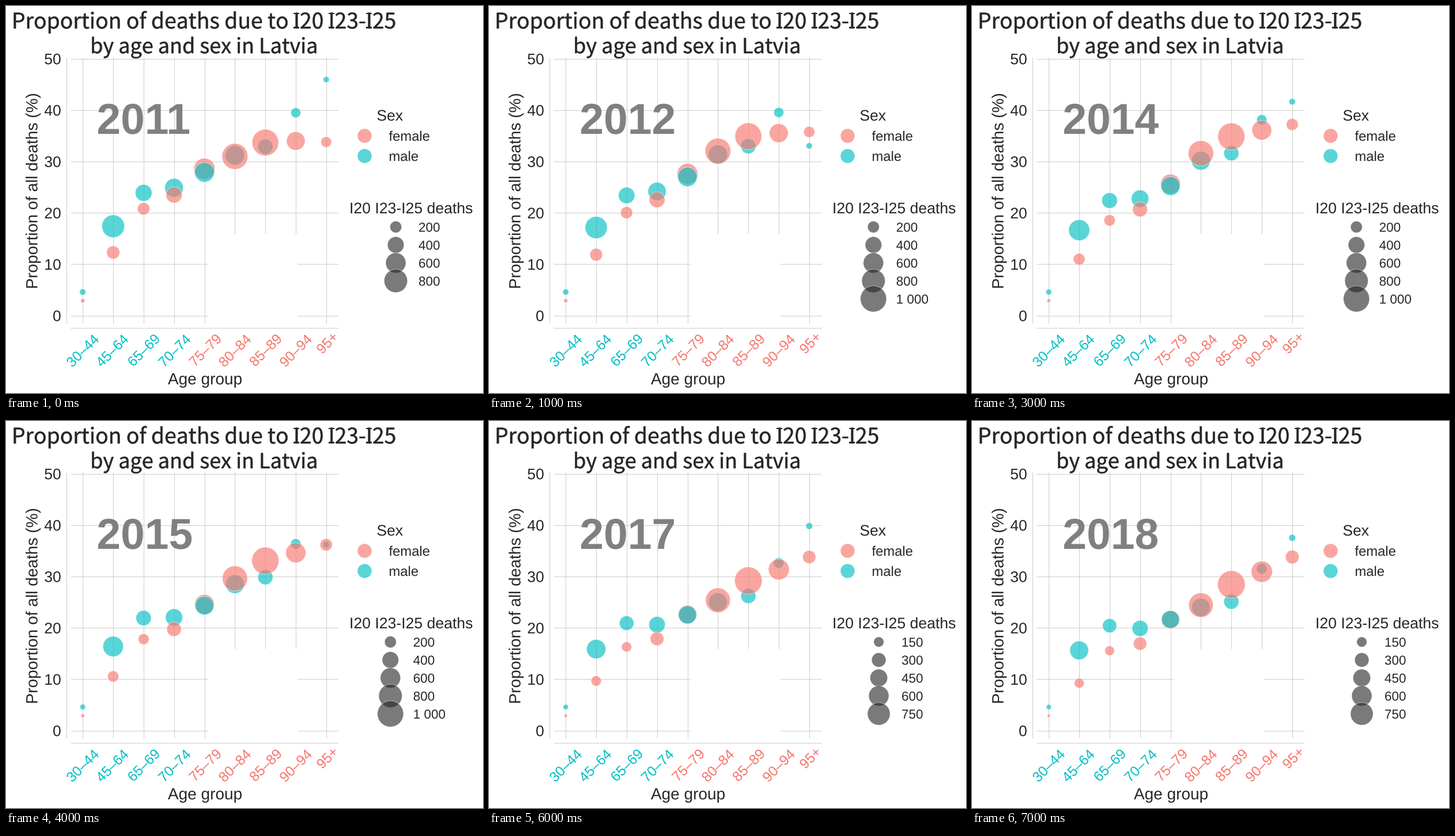
Write a matplotlib script that moves like this. It is 828 px wide and 672 px high and loops after 8 s.

```python
import numpy as np
import matplotlib.pyplot as plt
from matplotlib.animation import FuncAnimation
from matplotlib.patches import Circle, PathPatch, Rectangle
from matplotlib.textpath import TextPath
from matplotlib.transforms import Affine2D

W, H, DPI = 828, 672, 96
INK, GRID, YEAR_GRAY = "#262626", "#cccccc", "#808080"
FEMALE, MALE = "#F8766D", "#00BFC4"
SANS = {"family": "Liberation Sans"}
BOLD = {"family": "Liberation Sans", "weight": "bold"}
TITLE = {"family": "Noto Sans CJK JP"}

FIRST, YEARS = 2011, 8
AGES = ["30–44", "45–64", "65–69", "70–74", "75–79",
        "80–84", "85–89", "90–94", "95+"]
age = np.arange(len(AGES))
XS = 133.2 + 52.83 * age

# opening curves by age: share of deaths in percent, bubble radius in pixels
FEMALE_SHARE = [2.9, 12.3, 20.8, 23.5, 28.6, 31.0, 33.7, 34.0, 33.8]
MALE_SHARE = [4.6, 17.4, 23.9, 24.9, 27.9, 31.2, 32.9, 39.5, 38.5]
FEMALE_RADIUS = [3.6, 11.3, 10.8, 14, 18.2, 22.4, 23, 16, 9.2]
MALE_RADIUS = [5.4, 19.6, 14.5, 16, 17, 16.7, 13, 8.6, 5.2]

fig = plt.figure(figsize=(W / DPI, H / DPI), dpi=DPI, facecolor="white")
ax = fig.add_axes([0, 0, 1, 1])
ax.set_xlim(0, W)
ax.set_ylim(H, 0)
ax.axis("off")


def shares(k):
    """Shares sink over the years; the old first rise, the oldest men swing."""
    t = k / (YEARS - 1)
    rise = 3.5 * np.sin(np.pi * min(t / 0.75, 1)) * (age >= 5)
    swing = 8.5 * 0.75 ** k * np.cos(2 * np.pi * k / 3 + 0.5) * (age == 8)
    female_drop = 7 * (1 - ((age - 4) / 4) ** 2)
    male_drop = 8 * np.sin(np.pi * age / 14) * (age < 8)
    female = FEMALE_SHARE - female_drop * t + rise
    male = MALE_SHARE - male_drop * t + 0.6 * rise * (age < 8) + swing
    return female, male


def radii(k):
    """Young groups shrink and old groups grow."""
    t = k / (YEARS - 1)
    female = FEMALE_RADIUS * (1 + t * (0.0083 * age ** 2 - 0.26))
    male = MALE_RADIUS * (1 + t * (0.005 * age ** 2 - 0.18))
    return female, male


def share_y(v):
    return 537.65 - 8.92 * v


def text(s, x, y, size, color=INK, prop=SANS, ha="l", va="base", rot=0,
         z=3, lw=0):
    """Place text by its origin or by the edges of its ink."""
    path = TextPath((0, 0), s, size=size, prop=prop)
    path = path.transformed(Affine2D().rotate_deg(rot).scale(1, -1))
    box = path.get_extents()
    dx = {"l": 0, "ink": box.x0, "c": (box.x0 + box.x1) / 2, "r": box.x1}[ha]
    dy = {"base": 0, "top": box.y0, "c": (box.y0 + box.y1) / 2}[va]
    path = path.transformed(Affine2D().translate(x - dx, y - dy))
    return ax.add_patch(PathPatch(path, fc=color, ec=color, lw=lw, zorder=z))


def line(x0, y0, x1, y1):
    ax.plot([x0, x1], [y0, y1], color=GRID, lw=0.75, zorder=1,
            solid_capstyle="butt")


def bubble(x, y, r, color, alpha=0.65):
    return ax.add_patch(Circle((x, y), r, fc=color, ec="white", lw=0.6,
                               alpha=alpha, zorder=4))


def title_line(s, cx, base, size):
    """Centred title line whose capital I carries slab serifs."""
    box = TextPath((0, 0), s, size=size, prop=TITLE).get_extents()
    x = cx - (box.x0 + box.x1) / 2
    text(s, x, base, size, prop=TITLE, lw=0.4)
    for k, ch in enumerate(s):
        if ch != "I":
            continue
        right = TextPath((0, 0), s[:k + 1], size=size, prop=TITLE).get_extents().x1
        mid = x + right - 0.05 * size
        for top in (base - 0.733 * size, base - 2.6):
            ax.add_patch(Rectangle((mid - 5, top), 10, 2.6, fc=INK, lw=0, zorder=3))


def draw_static():
    title_line("Proportion of deaths due to I20 I23-I25", 344.5, 39, 37.3)
    title_line("by age and sex in Latvia", 344, 82, 36)

    for x in XS:
        line(x, 89, x, 551)
    for v in range(0, 51, 10):
        y = share_y(v)
        line(112, y, 577, y)
        text(str(v), 94.7, y + 9.5, 26.5, ha="r")
    line(105, 89, 105, 551)
    line(112, 559, 577, 559)
    ax.add_patch(Rectangle((350, 396), 156, 156, fc="white", lw=0, zorder=2))

    for i, (x, name) in enumerate(zip(XS, AGES)):
        text(name, x, 570.5, 24.5, MALE if i < 4 else FEMALE,
             ha="c", va="top", rot=45)
    text("Age group", 345, 657, 28, ha="c")
    text("Proportion of all deaths (%)", 54.5, 321, 28.1, va="c", rot=90)

    text("Sex", 666.7, 199, 26.5, ha="c")
    for name, color, y in (("female", FEMALE, 225.5), ("male", MALE, 260.5)):
        bubble(622.5, y, 12.5, color)
        text(name, 664.5, y + 8.5, 23.8)
    text("I20 I23-I25 deaths", 704, 360, 26.6, ha="c")


def size_legend(year):
    step = 150 if year >= 2017 else 200
    count = 4 if year in (2011, 2016) else 5
    x = 667.3 if step * count >= 1000 else 676.6
    parts = []
    for i in range(count):
        n, y = step * (i + 1), 383.7 + 31.2 * i
        parts.append(bubble(x, y, 0.715 * n ** 0.5, INK, 0.61))
        name = f"{n:,}".replace(",", " ")
        parts.append(text(name, x + 39.4, y + 8.2, 22.5, z=5))
    return parts


def update(k):
    while moving:
        moving.pop().remove()
    year = FIRST + k
    moving.append(text(str(year), 160, 222, 75, YEAR_GRAY, BOLD, ha="ink"))
    groups = zip(XS, AGES, *shares(k), *radii(k))
    for x, name, f_share, m_share, f_radius, m_radius in groups:
        pair = [(m_share, m_radius, MALE), (f_share, f_radius, FEMALE)]
        if name == "75–79":
            pair.reverse()
        for share, r, color in pair:
            moving.append(bubble(x, share_y(share), r, color))
    moving.extend(size_legend(year))
    return moving


moving = []
draw_static()
anim = FuncAnimation(fig, update, frames=YEARS, interval=1000,
                     init_func=lambda: [], repeat=True, repeat_delay=0)
plt.show()
```
